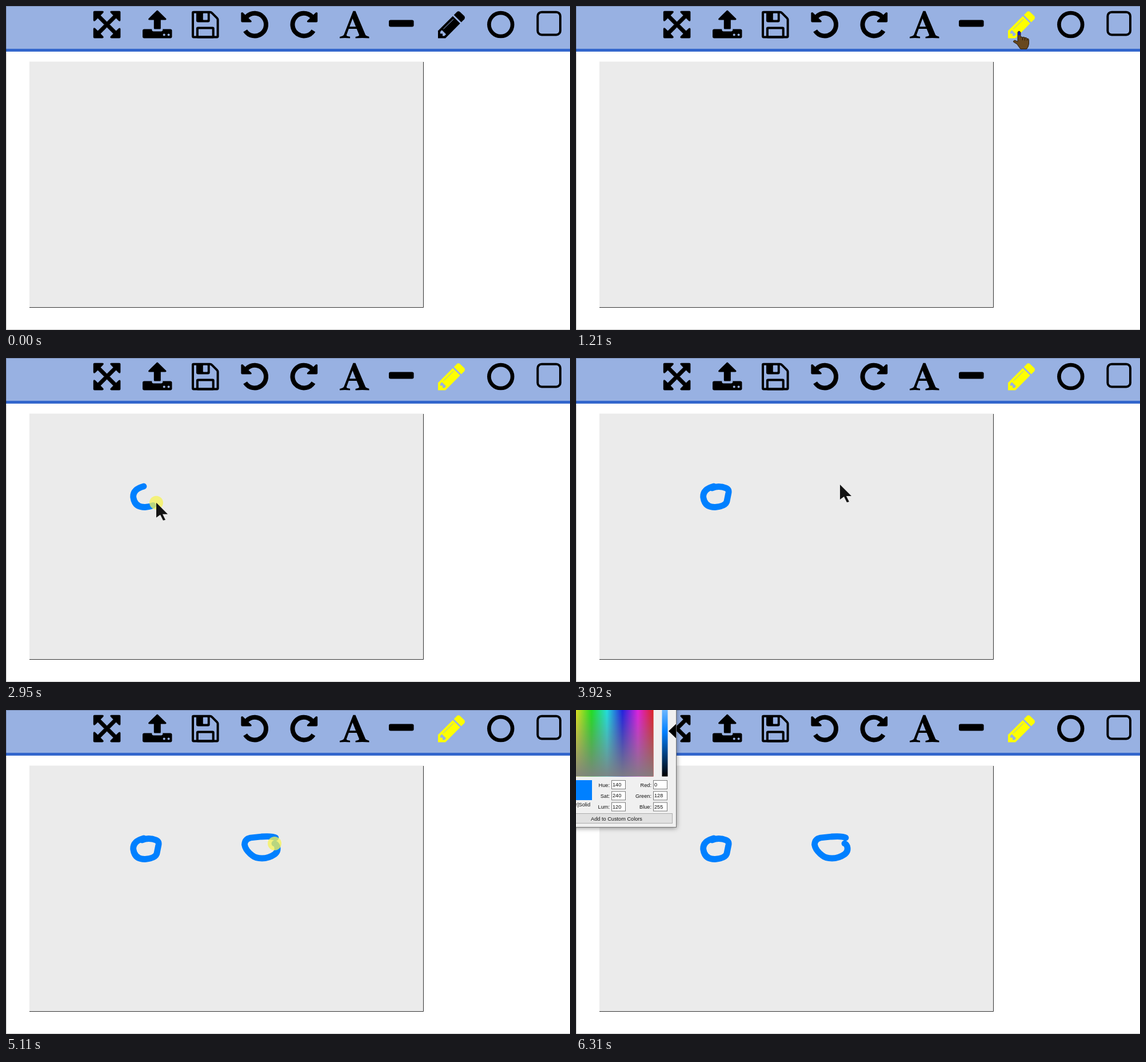
Animation, 987 px wide and 568 px high, one loop 8 s. Source, as an HTML page:

```html
<!DOCTYPE html>
<html lang="en">
<head>
<meta charset="utf-8">
<title>Drawing board</title>
<style>
  html, body { margin: 0; width: 100%; height: 100%; overflow: hidden; background: #fff; }
  svg { display: block; width: 987px; height: 568px; }
  text { font: 9.2px "Liberation Sans", Arial, sans-serif; fill: #111; }
  .ink { fill: none; stroke: #0080ff; stroke-width: 10.8; stroke-linecap: round; stroke-linejoin: round; }
  .line { fill: none; stroke: #000; stroke-width: 4; }
  .gap { fill: #98b1e2; }
  .end { text-anchor: end; }
  .mid { text-anchor: middle; }
  .box { fill: #fff; stroke: #7a7a7a; }
</style>
</head>
<body>
<svg viewBox="0 0 987 568">
  <defs>
    <linearGradient id="hues"></linearGradient>
    <linearGradient id="gray" x2="0" y2="1">
      <stop stop-color="#808080" stop-opacity=".27"/>
      <stop offset="1" stop-color="#808080" stop-opacity=".96"/>
    </linearGradient>
    <linearGradient id="lum" x2="0" y2="1">
      <stop stop-color="#6cb6ff"/>
      <stop offset=".33" stop-color="#0080ff"/>
      <stop offset="1"/>
    </linearGradient>
    <filter id="shade" x="-10%" y="-10%" width="130%" height="130%">
      <feGaussianBlur stdDeviation="4"/>
    </filter>
    <path id="arm" d="M-1-1L0 5 11 16 6.500 20.500q-2 3 1.400 3.300H21.800q2 0 2-2V8q-.3-3.500-3.300-1.400L16 11 5 0z"/>
    <g id="undo">
      <path class="line" stroke-width="8" style="stroke-width:8" d="M421.200 18.700A19.800 19.800 0 1 1 418.600 43.300"/>
      <path d="M411.400 12.500q.8-2.600 3.400-.8l14.400 14q1.600 2.400-1.200 2.800H413.400q-2 0-2-2z"/>
    </g>
  </defs>

  <rect width="987" height="568" fill="#fff"/>
  <rect width="987" height="75" class="gap"/>
  <rect y="75" width="987" height="5" fill="#3366cc"/>
  <rect x="41" y="97.500" width="689" height="430.500" fill="#ebebeb"/>
  <path d="M730.500 98V528.500H41" fill="none" stroke="#333"/>
  <rect x=".5" y=".5" width="987" height="567" fill="none" stroke="#000" stroke-opacity=".22"/>

  <g id="expand" transform="translate(176.600 32.600)"></g>
  <g id="upload">
    <rect x="239" y="40.500" width="51.500" height="15.900" rx="3"/>
    <rect class="gap" x="255.300" y="38" width="19" height="6.500" rx="3"/>
    <rect x="258.800" y="20" width="12" height="20.500" rx="1.500"/>
    <path d="M264.800 9L279 23H250.600z" stroke="#000" stroke-width="3" stroke-linejoin="round"/>
    <circle class="gap" cx="276.700" cy="50.400" r="2"/><circle class="gap" cx="284.600" cy="50.400" r="2"/>
  </g>
  <g id="save">
    <path class="line" d="M327 12q0-1.300 1.300-1.300H357q2 0 3.500 1.600l8.500 8.500q1.600 1.600 1.600 3.500V53q0 1.400-1.400 1.400H328.300Q327 54.400 327 53z"/>
    <rect x="333" y="9" width="23.700" height="19.600" rx="3"/>
    <rect class="gap" x="344.800" y="12.800" width="8" height="11.800" rx="1"/>
    <rect class="line" x="334.900" y="38.500" width="27.800" height="15.900" rx="1"/>
  </g>
  <use href="#undo"/>
  <use href="#undo" transform="translate(956.600) scale(-1 1)"/>
  <path fill-rule="evenodd" d="M584 56.400v-2.500q6-1 7.400-3.600L607.500 8.800h4L629 50.500q1 2 6.400 3.300l.2 2.600q-12-.6-24 0v-2.500l4-.8q3-.7 2.200-3L613.700 40H599.800L595.800 51q0 2 6.300 2.700v2.700q-9-.7-18.100 0zM606.500 22.100L601.200 36.200H612.200z"/>
  <rect id="minus" x="670" y="24.600" width="43.600" height="11.900" rx="3"/>
  <g id="pencil" transform="translate(756 56.400)">
    <path d="M0 0V-13L25.800-38.700 38.700-25.800 13 0z"/>
    <path d="M27.800-40.700L33-45.900q2.800-2.400 5.600 0L46-38.800q2 2.800 0 5.600L40.700-27.800z"/>
    <path class="gap" d="M11.300-4l2.800-2.800L6.800-14.100 4-11.300V-8H8V-4z"/>
    <path d="M9.700-16.300L26.900-33.100" stroke="#98b1e2" stroke-linecap="round"/>
  </g>
  <circle class="line" cx="865.800" cy="32.600" r="20.400" style="stroke-width:6.700"/>
  <rect class="line" x="930.400" y="10.700" width="39.600" height="39.700" rx="7"/>

  <path class="ink" id="ring1" d="M241 225Q222 230 222.700 244 225 262 243.500 261.500 262 260 264 251L267 236Q268 229 259 227 248 223.500 238 228"/>
  <path class="ink" id="ring2" d="M472 224Q466 220.500 447 222L428 224Q418 226 417.500 236 419 246 431 255 437 260 448 260 460 260 470 253 477 248 474.500 239 473 235 470 234"/>

  <g id="pointer">
    <circle id="click" r="12" fill="#f7f354" fill-opacity=".75"/>
    <path id="arrow" d="M0 0V26L7 21 12 31l4-1L11 20h9z" fill="#141414"/>
    <g id="hand">
      <path d="M-2 1Q0-3 3 1V9.500q2-1.500 3.500 .5 2.500-1.500 4 .5 2.500-1 4 1.500 3-.5 3 3V21q-.5 6-4 9.500H3q-4-5-6-8.500L-9.500 18q0-3.500 3.500-2.500l4 2z" fill="#68481d" stroke="#1d1407" stroke-width=".9"/>
      <path d="M6.500 10v5m4-4.500v5m4-3.500v4" stroke="#1d1407" stroke-width=".9"/>
      <path d="M-1.500 6V1Q.5-2 2.500 1V6z" fill="#0010d8"/>
    </g>
  </g>

  <g id="dialog">
    <rect x="-30" y="-30" width="206" height="237" fill-opacity=".45" filter="url(#shade)"/>
    <rect x="-2" y="-2" width="177.500" height="207.500" fill="#f0f0f0" stroke="#777"/>
    <rect width="135.500" height="116.500" fill="url(#hues)"/>
    <rect width="135.500" height="116.500" fill="url(#gray)"/>
    <rect x="150.500" width="10" height="116.500" fill="url(#lum)"/>
    <path d="M162 37L175 24.500V49.500z"/>
    <rect y="123" width="28" height="35" fill="#0080ff"/>
    <text class="end" x="25" y="169">r|Solid</text>
    <g id="fields"></g>
    <rect x="-5.500" y="181.500" width="174" height="17" fill="#e1e1e1" stroke="#adadad"/>
    <text class="mid" x="71" y="193.500">Add to Custom Colors</text>
  </g>
</svg>
<script>
const LOOP = 8000;
const $ = id => document.getElementById(id);
const show = (el, on) => el.setAttribute('visibility', on ? 'visible' : 'hidden');

$('expand').innerHTML = [0, 90, 180, 270]
  .map(a => `<use href="#arm" transform="rotate(${a})"/>`).join('');
$('hues').innerHTML = [60, 120, 180, 240, 300, 360]
  .map((h, i) => `<stop offset="${i / 5}" stop-color="hsl(${h} 100% 50%)"/>`).join('');

const field = (label, value, x, y) =>
  `<text class="end" x="${x - 3}" y="${y + 11.5}">${label}:</text>
   <rect class="box" x="${x + .5}" y="${y + .5}" width="24" height="15"/>
   <text x="${x + 2}" y="${y + 11}">${value}</text>`;
$('fields').innerHTML = [['Hue', 140, 'Red', 0], ['Sat', 240, 'Green', 128], ['Lum', 120, 'Blue', 255]]
  .map(([a, m, b, n], i) => field(a, m, 62, 123 + i * 19.3) + field(b, n, 135, 123 + i * 19.3)).join('');

function track(d) {
  const path = document.createElementNS('http://www.w3.org/2000/svg', 'path');
  path.setAttribute('d', d);
  return path;
}

// Each move follows a path in equal time steps; power below 1 eases out
const moves = [
  { at: 100, steps: 8, path: track('M885 560Q830 200 700 45H775') },
  { at: 1420, steps: 4, path: track('M775 45Q450 230 148 334') },
  { at: 1980, steps: 4, pace: 100, path: track('M148 334L312 211') },
  { at: 2400, steps: 4, path: track('M312 211L241 225') },
  { at: 2820, steps: 5, power: .55, path: $('ring1'), inks: true },
  { at: 3370, steps: 6, power: .5, path: track('M241 227L462 222') },
  { at: 4040, steps: 1, path: track('M462 222H472') },
  { at: 4150, steps: 9, pace: 107, path: $('ring2'), inks: true }
];
for (const m of moves) {
  m.pace ??= 110;
  m.length = m.path.getTotalLength();
}

function reached(m, t) {
  const step = Math.floor((t - m.at) / m.pace) + 1;
  const p = Math.max(0, Math.min(1, step / m.steps));
  return m.length * p ** (m.power ?? 1);
}

function drawInk(m, t) {
  const len = reached(m, t);
  const lag = len < m.length ? 8 : 0;
  show(m.path, len > 0);
  m.path.setAttribute('stroke-dasharray', `${Math.max(.1, len - lag)} 999`);
}

function draw(t) {
  const m = moves.findLast(v => v.at <= t) ?? moves[0];
  const { x, y } = m.path.getPointAtLength(reached(m, t));
  const moving = t >= 100 && t < 5110;
  const over = moving && y < 60;
  const picked = t >= 970;
  $('pointer').setAttribute('transform', `translate(${x} ${y})`);
  show($('arrow'), moving && !over);
  show($('hand'), over);
  show($('click'), m.inks && t < m.at + m.steps * m.pace);
  moves.filter(v => v.inks).forEach(v => drawInk(v, t));

  $('minus').setAttribute('fill', over && x < 714 ? '#00f' : '#000');
  $('pencil').setAttribute('fill', picked ? '#ff0' : over && x > 756 ? '#00f' : '#000');

  const fade = (Math.floor((t - 6100) / 105) + 1) / 3;
  $('dialog').setAttribute('opacity', Math.max(0, Math.min(1, fade)));
}

const began = performance.now();
function tick() {
  draw((performance.now() - began) % LOOP);
  requestAnimationFrame(tick);
}
tick();
</script>
</body>
</html>
```
